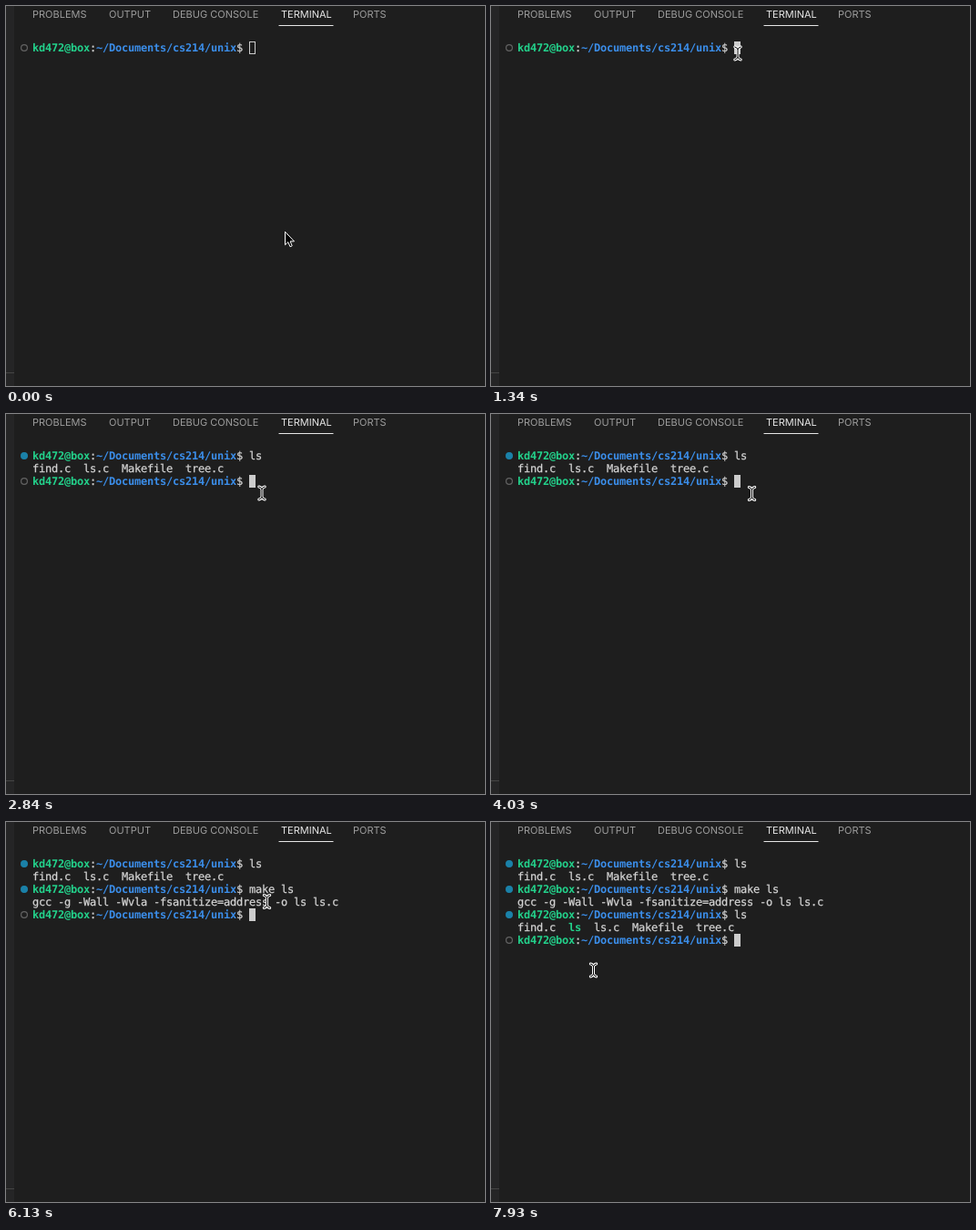
Animation, 526 px wide and 418 px high, one loop 8 s. Source, as an HTML page:

```html
<!DOCTYPE html>
<html lang="en">
<head>
<meta charset="utf-8">
<title>Terminal session</title>
<style>
  html, body { margin: 0; width: 100%; height: 100%; overflow: hidden; background: #1e1e1e; }
  svg { display: block; width: 526px; height: 418px; }
  text { white-space: pre; text-rendering: geometricPrecision; }
  .tabs { font: 11px Inter, Roboto, sans-serif; fill: #9d9d9d; }
  .tabs .active { fill: #e7e7e7; }
  .term { font: 12px "DejaVu Sans Mono", monospace; letter-spacing: -.2246px; fill: #d4d4d4; }
  .term text { stroke: #d4d4d4; stroke-width: .25px; }
  .user, .path { font-weight: bold; stroke: none; }
  .user { fill: #23d18b; }
  .path { fill: #3b8eea; }
  .dot { fill: none; stroke: #636363; stroke-width: 1.2; }
  .dot.done { fill: #1b81a8; stroke: #1b81a8; }
  #caret { fill: none; stroke: #ccc; }
  #caret.focus { fill: #ccc; }
  .halo { stroke: #fff; stroke-width: 3; }
  .core { stroke: #000; stroke-width: 1; }
</style>
</head>
<body>
<svg viewBox="0 0 526 418">
  <defs>
    <path id="ibeam" fill="none" stroke-linecap="round" d="M-3.2-7Q-.8-6.6 0-4.2Q.8-6.6 3.2-7M0-4.2V4.2M-3.2 7Q-.8 6.6 0 4.2Q.8 6.6 3.2 7"/>
  </defs>
  <rect width="526" height="418" fill="#1e1e1e"/>
  <rect width="9" height="418" fill="#252526"/>
  <rect y="403" width="9" height="1" fill="#454545"/>
  <g class="tabs">
    <text x="29" y="12.5">PROBLEMS</text>
    <text x="113" y="12.5">OUTPUT</text>
    <text x="183" y="12.5">DEBUG CONSOLE</text>
    <text x="302" y="12.5" class="active">TERMINAL</text>
    <text x="381" y="12.5">PORTS</text>
  </g>
  <rect x="299.5" y="21" width="60" height="1" fill="#e7e7e7"/>
  <g class="term" id="term"></g>
  <rect id="caret" width="6" height="13"/>
  <path id="arrow" d="M306.5 248.3V262.8L309.8 259.7L312 264.8L314.2 263.8L312.1 258.9H316.5Z" fill="#000" stroke="#fff"/>
  <g id="beam"><use href="#ibeam" class="halo"/><use href="#ibeam" class="core"/></g>
</svg>
<script>
  // The screen refreshes in ticks; every moment below is a tick number.
  const LOOP = 8000, FIRST_TICK = 286, TICK = 149.6;
  const LEFT = 29, TOP = 39, CELL = 7, LINE = 14;
  const FOCUS = 6, CHARS_PER_TICK = 1.34;

  const PROMPT = '<tspan class="user">kd472@box</tspan>:' +
    '<tspan class="path">~/Documents/cs214/unix</tspan>$ ';
  const PROMPT_LENGTH = PROMPT.replace(/<[^>]*>/g, '').length;

  // Each command is typed in bursts, then prints its output on Enter.
  const session = [
    { bursts: [{ from: 13, text: 'ls' }], enter: 15,
      output: 'find.c  ls.c  Makefile  tree.c' },
    { bursts: [{ from: 31, text: 'make ' }, { from: 37, text: 'ls' }], enter: 39,
      output: 'gcc -g -Wall -Wvla -fsanitize=address -o ls ls.c' },
    { bursts: [{ from: 44, text: 'ls' }], enter: 46,
      output: 'find.c  <tspan class="user">ls</tspan>  ls.c  Makefile  tree.c' },
    { bursts: [], enter: Infinity }
  ];

  // Pointer glides; sag bends the path downwards.
  const home = { x: 306, y: 248 };
  const glides = [
    { from: 0, to: 6, x: 271, y: 52, sag: 0 },
    { from: 17, to: 17, x: 281, y: 87, sag: 0 },
    { from: 18, to: 19, x: 196, y: 101, sag: 17 },
    { from: 21, to: 25, x: 286.5, y: 87.5, sag: 0 },
    { from: 49, to: 51, x: 112.5, y: 163, sag: 30 }
  ];

  const $ = id => document.getElementById(id);
  const term = $('term'), caret = $('caret'), arrow = $('arrow'), beam = $('beam');
  const clamp = v => Math.min(1, Math.max(0, v));
  const ease = p => p * p * (3 - 2 * p);

  const typed = (burst, tick) => tick < burst.from ? '' :
    burst.text.slice(0, Math.floor(1 + (tick - burst.from) * CHARS_PER_TICK));

  function drawTerminal(tick) {
    let html = '', y = TOP;
    const addLine = body => {
      html += `<text x="${LEFT}" y="${y + 11}">${body}</text>`;
      y += LINE;
    };
    for (const { bursts, enter, output } of session) {
      const done = tick >= enter;
      const cmd = bursts.map(b => typed(b, tick)).join('');
      html += `<circle class="dot${done ? ' done' : ''}" cx="20" cy="${y + 7}" r="3.4"/>`;
      if (!done) {
        caret.setAttribute('x', LEFT + (PROMPT_LENGTH + cmd.length) * CELL + .5);
        caret.setAttribute('y', y + .5);
      }
      addLine(PROMPT + cmd);
      if (!done) break;
      addLine(output);
    }
    term.innerHTML = html;
    caret.classList.toggle('focus', tick >= FOCUS);
  }

  function drawPointer(tick) {
    let { x, y } = home;
    for (const g of glides) {
      const p = ease(clamp((tick - g.from + 1) / (g.to - g.from + 1)));
      x += (g.x - x) * p;
      y += (g.y - y) * p + g.sag * 4 * p * (1 - p);
    }
    arrow.style.display = tick < 0 ? '' : 'none';
    beam.style.display = tick < 0 ? 'none' : '';
    beam.setAttribute('transform', `translate(${x} ${y})`);
  }

  const start = performance.now();
  let last;
  function frame() {
    const t = (performance.now() - start) % LOOP;
    const tick = Math.floor((t - FIRST_TICK) / TICK);
    if (tick !== last) {
      last = tick;
      drawTerminal(tick);
      drawPointer(tick);
    }
    requestAnimationFrame(frame);
  }
  frame();
</script>
</body>
</html>
```
